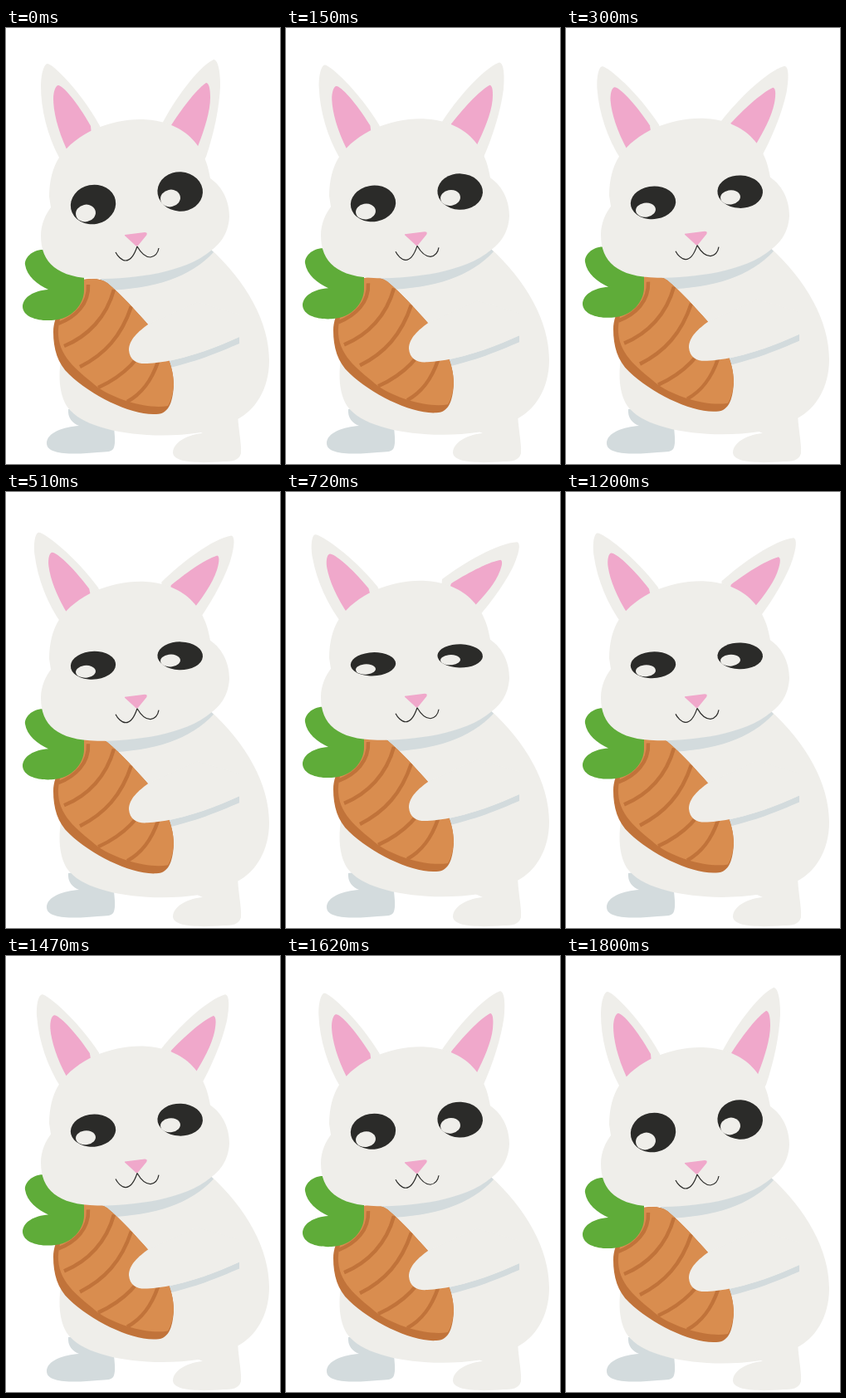
An HTML page with a canvas that plays this animation: 330 px wide and 525 px high, repeating every 1830 ms.

```html
<!DOCTYPE html>
<html lang="en">
<head>
<meta charset="utf-8">
<title>Rabbit with carrot</title>
<style>
html, body { margin: 0; width: 100%; height: 100%; overflow: hidden; background: #fff; }
canvas { display: block; }
</style>
</head>
<body>
<canvas id="stage" width="330" height="525"></canvas>
<script>
const ctx = document.getElementById('stage').getContext('2d');
const LOOP = 1830, STEP = 30, PEAK = 890, END = 1795;
const FUR = '#efeeea', GRAY = '#d3dbdd', PINK = '#f0a8cb', INK = '#2b2b29';
const ORANGE = '#d98d4f', RUST = '#c1733a', GREEN = '#5fac39';

const shape = {
  backFoot: 'M75 459L100 456L130 481C131 491 132 499 130 505C128 511 122 510 110 511C90 513 49 516 49 500C49 487 70 480 88 479C80 476 74 469 75 459Z',
  frontFoot: 'M279 460C279 480 284 500 283 512C281 521 272 522 262 522C240 524 201 525 201 511C202 497 222 489 237 488L228 484L240 460Z',
  body: 'M120 290L245 265C290 305 317 355 317 400C317 435 300 460 279 471L235 487C170 497 100 485 78 461C66 450 62 425 66 400L100 330Z',
  scarf: 'M110 295L244 264L250 270C222 300 180 314 120 316Z',
  armShade: 'M185 403C225 396 255 384 281 372L281 380C255 391 230 402 185 412Z',
  arm: 'M171 357C160 365 148 375 148 388C149 400 158 405 170 404C210 402 250 385 281 372L281 345L230 330Z',
  carrot: 'M93 303C105 301 115 302 122 307C140 322 156 340 171 357C190 382 202 405 202 430C201 446 198 465 181 465C152 467 103 443 76 417C62 404 57 386 57 366C57 345 72 325 93 303Z',
  flesh: 'M93 303C105 301 115 302 122 307C140 322 156 340 171 357C190 382 202 405 202 430C201 440 199 449 195 455C172 459 135 449 111 433C90 415 65 399 63 370C62 345 75 325 93 303Z',
  stripes: 'M99 309C100 332 84 348 63 356M130 315C121 348 99 371 70 383M151 335C139 371 119 393 89 408M172 370C165 396 142 419 111 433M183 402C175 425 164 440 146 450',
  leaves: 'M46 267C32 266 22 277 23 285C25 299 38 309 51 315C34 316 20 324 20 336C21 348 38 353 55 352C80 351 94 332 94 316L94 290L60 270Z',
  head: 'M52 203C52 185 56 168 64 156C85 126 125 110 162 110C195 110 238 125 246 181C262 192 269 210 269 227C268 250 255 262 247 268C215 295 155 302 110 302C62 301 42 283 42 250C42 236 48 224 54 216Z',
  leftEar: 'M75 175L64 156C50 130 42 98 42 70C42 55 46 43 50 43C56 43 90 76 113 118L120 145Z',
  leftInner: 'M80 160L73 146C62 122 57 100 57 85C57 76 60 69 63 69C68 69 85 88 102 118L104 140Z',
  rightEar: 'M250 38C256 38 258 55 258 70C257 95 251 125 241 155L225 180L195 140L187 117C202 88 230 48 250 38Z',
  rightInner: 'M241 66C245 66 246 76 246 84C246 100 239 122 232 140L226 155L200 125L199 117C210 100 227 76 241 66Z',
  nose: 'M143 249L167 246C171 246 170 249 168 251L159 262Q157 264 155 261L143 250Z',
  mouth: 'M158 263C155 272 150 280 144 280C139 280 134 274 132 270M158 263C162 270 168 276 174 276C180 275 183 271 184 265'
};
for (const k in shape) shape[k] = new Path2D(shape[k]);

function fill(name, color) {
  ctx.fillStyle = color;
  ctx.fill(shape[name]);
}

function stroke(name, color, width) {
  ctx.strokeStyle = color;
  ctx.lineWidth = width;
  ctx.stroke(shape[name]);
}

function lifted(dy, draw) {
  ctx.save();
  ctx.translate(0, dy);
  draw();
  ctx.restore();
}

function ear(side, x, y, degrees) {
  ctx.save();
  ctx.translate(x, y);
  ctx.rotate(degrees * Math.PI / 180);
  ctx.translate(-x, -y);
  fill(side + 'Ear', FUR);
  fill(side + 'Inner', PINK);
  ctx.restore();
}

function oval(x, y, rx, ry, tilt, color) {
  ctx.fillStyle = color;
  ctx.beginPath();
  ctx.ellipse(x, y, rx, ry, tilt, 0, Math.PI * 2);
  ctx.fill();
}

function eye(x, y, open, tilt, dx, dy) {
  ctx.save();
  ctx.translate(x, y);
  ctx.scale(1, open);
  oval(0, 0, 27.3, 23.7, tilt, INK);
  oval(dx, dy, 12, 10.3, -0.2, FUR);
  ctx.restore();
}

function render(p) {
  const rise = -4 * p, lift = -10 * p, open = 1 - 0.5 * p;
  ctx.fillStyle = '#fff';
  ctx.fillRect(0, 0, 330, 525);

  fill('backFoot', GRAY);
  lifted(rise, () => {
    fill('body', FUR);
    fill('scarf', GRAY);
  });
  fill('frontFoot', FUR);

  lifted(lift, () => {
    fill('armShade', GRAY);
    fill('carrot', RUST);
    fill('flesh', ORANGE);
    ctx.save();
    ctx.clip(shape.carrot);
    stroke('stripes', RUST, 4.5);
    ctx.restore();
    fill('arm', FUR);
    fill('leaves', GREEN);
  });

  lifted(rise, () => {
    ear('left', 108, 133, -12.5 * p);
    ear('right', 207, 115, 31 * p);
    fill('head', FUR);
    fill('nose', PINK);
    stroke('mouth', INK, 1.2);
  });

  eye(105, 212.5 - 6.5 * p, open, -0.2, -9, 10.5);
  eye(209.7, 197 + 0.5 * p, open, 0.05, -11.7, 8);
}

// Straight out and back, with a short rest before the loop restarts.
function pose(t) {
  return t < PEAK ? t / PEAK : Math.max(0, (END - t) / (END - PEAK));
}

const start = performance.now();
function tick() {
  const t = Math.max(0, performance.now() - start) % LOOP;
  render(pose(Math.floor(t / STEP) * STEP));
  requestAnimationFrame(tick);
}
tick();
</script>
</body>
</html>
```
